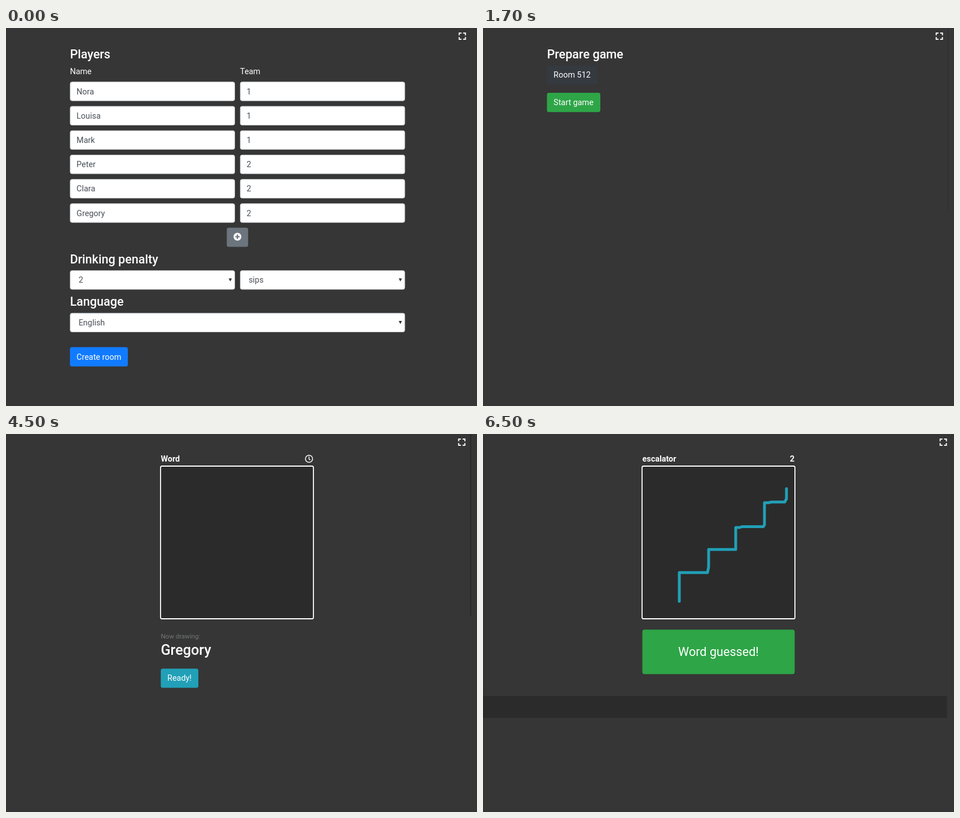
These frames come from a looping animation (835 by 671 pixels, 8000 ms). An HTML page:

```html
<!DOCTYPE html>
<html lang="en">
<head>
<meta charset="utf-8">
<title>Drawing game</title>
<style>
html, body { margin: 0; width: 100%; height: 100%; overflow: hidden; background: #363636; }
svg { display: block; width: 835px; height: 671px; }
text { font: 14.4px Roboto, sans-serif; fill: #fff; }
.h { font-size: 21.6px; font-weight: 500; }
.name { font-size: 25.2px; font-weight: 500; }
.big { font-size: 21.6px; text-anchor: middle; }
.bold { font-weight: 700; }
.end { text-anchor: end; }
.small { font-size: 11.52px; fill: #737577; }
.field { fill: #495057; }
</style>
</head>
<body>
<svg id="stage" viewBox="0 0 835 671"></svg>
<script>
const LOOP = 8000;
const STARTS = [0, 500, 2500, 4500, 6500];
const PLAYERS = [["Nora", 1], ["Louisa", 1], ["Mark", 1], ["Peter", 2], ["Clara", 2], ["Gregory", 2]];
const GREY = "#6c757d", GREEN = "#2ea547", BLUE = "#117bff", TEAL = "#21a0b7";

const text = (x, y, s, cls = "") => `<text x="${x}" y="${y}" class="${cls}">${s}</text>`;
const rect = (x, y, w, h, fill, r = 0, extra = "") =>
  `<rect x="${x}" y="${y}" width="${w}" height="${h}" rx="${r}" fill="${fill}" ${extra}/>`;
const path = (d, stroke, width, extra = "") =>
  `<path d="${d}" fill="none" stroke="${stroke}" stroke-width="${width}" ${extra}/>`;

const button = (x, y, w, fill, label) =>
  rect(x, y, w, 34.2, fill, 3.6) + (label ? text(x + 11.7, y + 21.9, label) : "");
const input = (x, y, w, label, pad = 11.7) =>
  rect(x + .45, y + .45, w - .9, 33.3, "#fff", 3.2, 'stroke="#ced4da" stroke-width=".9"') +
  text(x + pad, y + 22.2, label, "field");
const select = (x, y, w, label) => input(x, y, w, label, 15.3) +
  `<path d="M${x + w - 11.2} ${y + 14.3}h5.8l-2.9 5.4z" fill="#333"/>`;

const expand = cx => path(
  `M${cx - 5.5} 13v-4h4M${cx + 1.5} 9h4v4M${cx + 5.5} 16v4h-4M${cx - 1.5} 20h-4v-4`, "#fff", 1.9);
const clock = cx => `<circle cx="${cx}" cy="44" r="6.3" fill="none" stroke="#fff" stroke-width="1.5"/>` +
  path(`M${cx} 40v4.4l2.2 1.7`, "#fff", 1.4);
const board = x => rect(x + 1, 57, 271, 271, "#2b2b2b", 2.6, 'stroke="#fff" stroke-width="1.8"');

const plus = `<circle cx="410.3" cy="370.5" r="6.9" fill="#fff"/>` +
  path("M406.3 370.5h8M410.3 366.5v8", GREY, 2.2);
const clipboard = rect(253, 358.2, 10.8, 12.7, "#fff", 1.3) +
  `<circle cx="258.4" cy="358.3" r="1.8" fill="#fff"/>` +
  `<circle cx="258.4" cy="358.3" r=".6" fill="${GREY}"/>` +
  path("M255 362.9h1.4M255 365.6h1.4M255 368.3h1.4M257.4 362.9h4.5M257.4 365.6h4.5M257.4 368.3h4.5", GREY, 1);

const stairs = "M348 297V246H398L400 236V205H448V166H455L459 164.5H497L499 161V122H506L512 120.7H535L538 115V97";

const scenes = [
  expand(809) +
  text(113.4, 54, "Players", "h") + text(113.4, 82, "Name") + text(415, 82, "Team") +
  PLAYERS.map(([name, team], i) => {
    const y = 95.4 + 43.2 * i;
    return input(113.4, y, 292.5, name) + input(414.9, y, 292.5, team);
  }).join("") +
  button(391.4, 354.4, 37.8, GREY) + plus +
  text(113.4, 417.5, "Drinking penalty", "h") +
  select(113.4, 430.2, 292.5, "2") + select(414.9, 430.2, 292.5, "sips") +
  text(113.4, 493, "Language", "h") + select(113.4, 505.8, 594, "English") +
  button(113.4, 566.6, 102.6, BLUE, "Create room"),

  expand(809) + rect(824, 0, 1, 323.5, "#2d2d2d") +
  text(113.4, 54, "Prepare game", "h") +
  button(113.4, 66.5, 89, "#343a40", "Room 512") +
  button(113.4, 115.1, 94.6, GREEN, "Start game"),

  rect(440, 0, 385, 323.5, "#26272a") +
  expand(427.5) + clock(347.3) + board(83) +
  button(163.8, 347.1, 111.5, GREY, "Scoreboard") + clipboard,

  expand(808) + rect(822.5, 0, 2.5, 323.5, "#2b2b2b") +
  text(274.4, 49.3, "Word", "bold") + clock(537.2) + board(273) +
  text(274.4, 363, "Now drawing:", "small") +
  text(274.4, 392, PLAYERS[5][0], "name") +
  button(274.4, 416.4, 66.6, TEAL, "Ready!"),

  rect(0, 465, 822.5, 39, "#2b2b2b") +
  path("M2.5 0V465M831 0V465", "#303030", 1) +
  expand(816) +
  text(282.5, 49.3, "escalator", "bold") + text(552.3, 49.3, "2", "bold end") + board(281) +
  path(stairs, TEAL, 5, 'stroke-linecap="round" stroke-linejoin="round"') +
  rect(282.5, 347.3, 270, 79, GREEN, 4) +
  text(417.5, 394, "Word guessed!", "big")
];

const stage = document.getElementById("stage");
stage.innerHTML = scenes.map(s => `<g visibility="hidden">${s}</g>`).join("");
const groups = [...stage.children];
const origin = performance.now();

function draw(now) {
  const t = Math.max(0, now - origin) % LOOP;
  const current = STARTS.filter(s => s <= t).length - 1;
  groups.forEach((g, i) => g.setAttribute("visibility", i === current ? "visible" : "hidden"));
  requestAnimationFrame(draw);
}
draw(origin);
</script>
</body>
</html>
```
